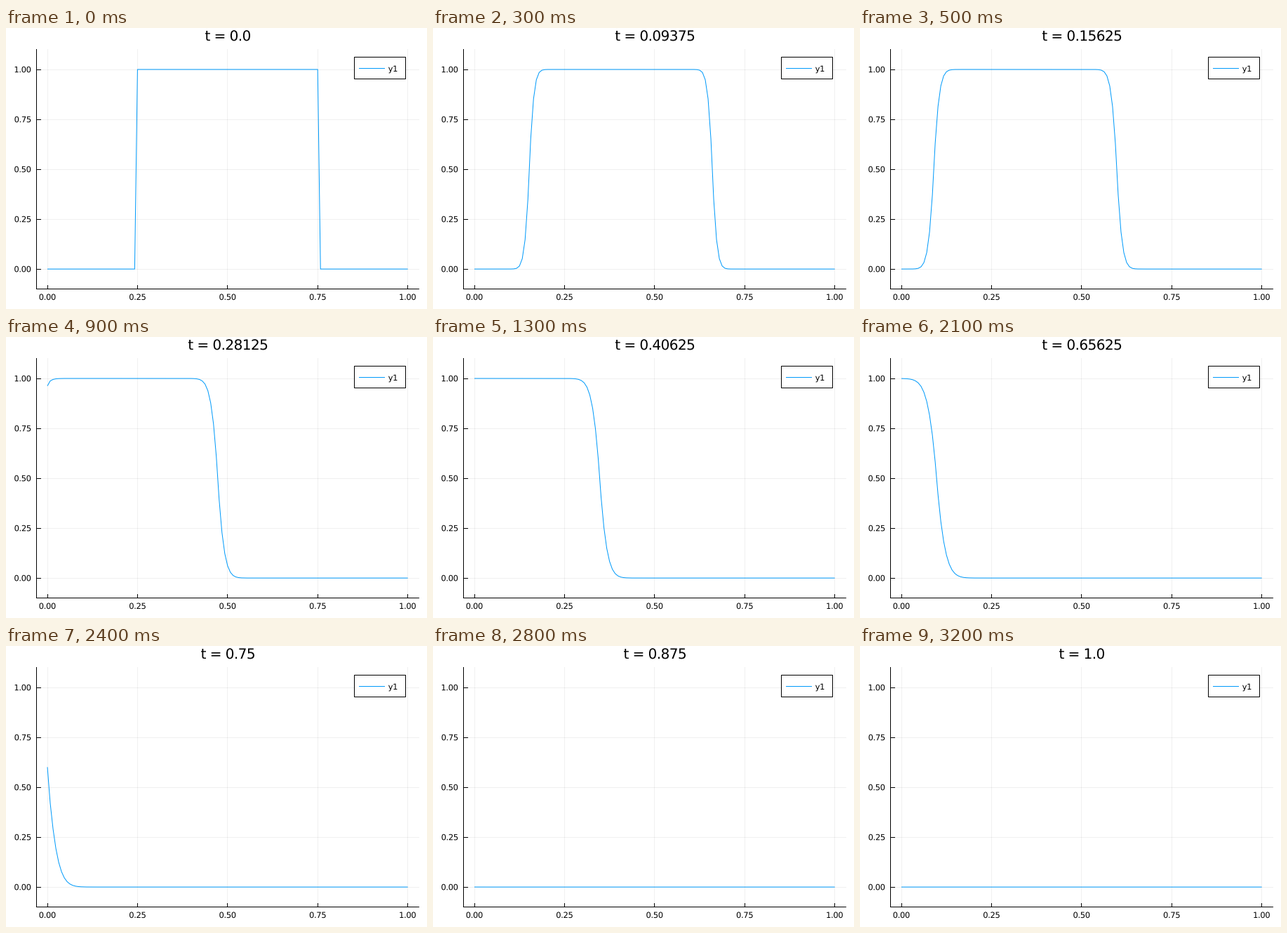
Write a matplotlib script that moves like this. It is 600x400 px and loops after 3.3 s.

```python
import numpy as np
import matplotlib.pyplot as plt
from matplotlib.animation import FuncAnimation
from matplotlib.patches import PathPatch, Rectangle
from matplotlib.path import Path
from matplotlib.textpath import TextPath

W, H, DPI = 600, 400, 100
FRAMES, INTERVAL = 33, 100
CELLS, CFL, STEPS = 128, 0.5, 8
BLUE = "#009afa"
PX = 72 / DPI  # one pixel in points
SMALL, LARGE, TRACKING = 11.5, 20.1, -0.03

plt.rcParams["font.family"] = "DejaVu Sans"


def advect(u):
    """One step of u_t = u_x with the minmod limiter, open on the left."""
    d = np.diff(np.pad(u, 1, mode="edge"))
    a, b = d[:-1], d[1:]
    slope = np.where(a * b > 0, np.sign(a) * np.minimum(abs(a), abs(b)), 0)
    face = u - 0.5 * (1 - CFL) * slope
    return u + CFL * (np.append(face[1:], 0) - face)


def solve():
    x = np.linspace(0, 1, CELLS + 1)
    u = np.where((x >= 0.25) & (x <= 0.75), 1.0, 0.0)
    states = [u]
    for _ in range(FRAMES - 1):
        for _ in range(STEPS):
            u = advect(u)
        states.append(u)
    return x, states


def to_x(v):
    return 59.0 + 513.6 * v


def to_y(v):
    return 343.1 - 284.1 * v


def right_edge(text, size):
    return TextPath((0, 0), text, size=size).get_extents().x1


def text_path(x, y, text, size=SMALL, align=0.5):
    """Outline of tightly tracked text; align 0, 0.5, 1 is left, centre, right."""
    glyphs, pen = [], 0
    for ch in text:
        if ch != " ":
            glyphs.append(TextPath((pen, 0), ch, size=size))
        advance = right_edge(ch + "|", size) - right_edge("|", size)
        pen += advance + TRACKING * size
    path = Path.make_compound_path(*glyphs)
    box = path.get_extents()
    shift = x - box.x0 - align * box.width
    return Path(path.vertices * [1, -1] + [shift, y], path.codes)


fig = plt.figure(figsize=(W / DPI, H / DPI), dpi=DPI, facecolor="white")
ax = fig.add_axes([0, 0, 1, 1])
ax.set_xlim(0, W)
ax.set_ylim(H, 0)
ax.axis("off")


def stroke(xs, ys, color="black", **kw):
    return ax.plot(xs, ys, color=color, lw=PX, **kw)[0]


def label(*args, **kw):
    patch = PathPatch(text_path(*args, **kw), fc="black", lw=0, zorder=5)
    return ax.add_patch(patch)


LEFT, RIGHT, TOP, BOTTOM, TICK = 43, 588, 30, 371, 5.5

for v in np.linspace(0, 1, 5):
    px, py = int(to_x(v)), int(to_y(v))
    stroke([px, px], [TOP, BOTTOM], alpha=0.06, zorder=1)
    stroke([LEFT, RIGHT], [py, py], alpha=0.06, zorder=1)
    stroke([px, px], [BOTTOM, BOTTOM - TICK], zorder=2)
    stroke([LEFT, LEFT + TICK], [py, py], zorder=2)
    label(to_x(v), 387, f"{v:.2f}")
    label(35.2, to_y(v) + 4.2, f"{v:.2f}", align=1)

stroke([LEFT, LEFT], [TOP, BOTTOM], zorder=2)
stroke([LEFT, RIGHT], [BOTTOM, BOTTOM], zorder=2)

# Legend
ax.add_patch(Rectangle((496, 41), 73, 31, fc="white", ec="black", lw=PX, zorder=4))
stroke([503, 539], [57, 57], BLUE, zorder=5)
label(545, 62, "y1", align=0)

x, states = solve()
curve = stroke(to_x(x), to_y(states[0]), BLUE, zorder=3, snap=False,
               solid_capstyle="butt", solid_joinstyle="round")


def title_path(i):
    return text_path(316, 18.1, f"t = {i / (FRAMES - 1)}", size=LARGE)


title = ax.add_patch(PathPatch(title_path(0), fc="black", lw=0))


def update(i):
    curve.set_ydata(to_y(states[i]))
    title.set_path(title_path(i))
    return curve, title


anim = FuncAnimation(fig, update, frames=FRAMES, interval=INTERVAL,
                     repeat=True, repeat_delay=0)
plt.show()
```
